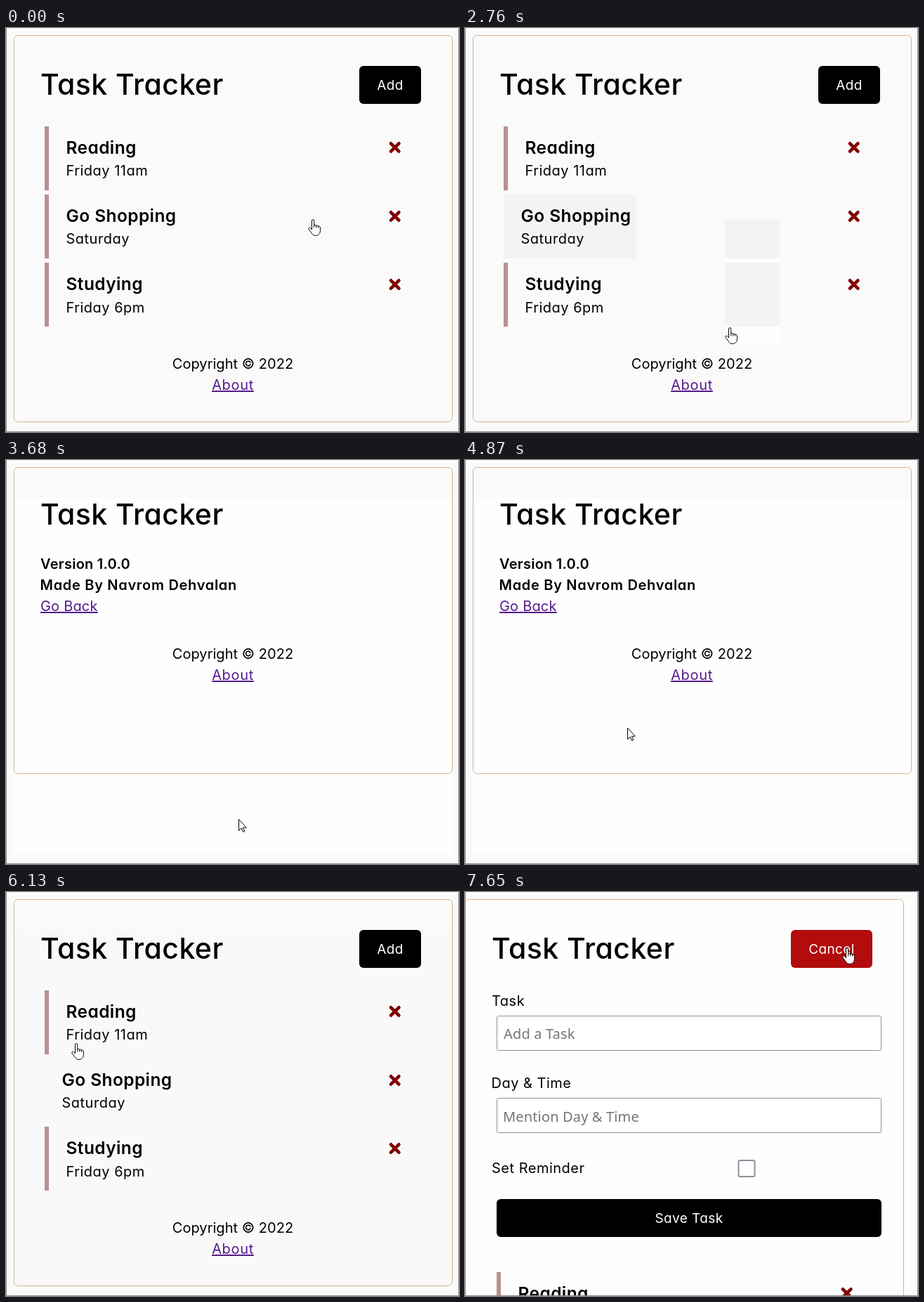
An HTML page for the animation above (8000 ms loop, 645 by 575 pixels).

```html
<!DOCTYPE html>
<html lang="en">
<head>
<meta charset="utf-8">
<title>Task Tracker</title>
<style>
html, body { margin: 0; width: 100%; height: 100%; overflow: hidden; background: #fafafa; }
svg { display: block; width: 100%; height: 100%; }
text { font: 400 20px Inter, "Open Sans", sans-serif; font-feature-settings: "cv11"; letter-spacing: .05px; white-space: pre; }
.title { font-size: 41px; font-weight: 500; letter-spacing: .45px; }
.name { font-size: 24.5px; font-weight: 600; letter-spacing: .4px; }
.sub { letter-spacing: .5px; }
.strong { font-weight: 600; letter-spacing: .25px; }
.credit { letter-spacing: .7px; }
.mid { text-anchor: middle; }
.link { fill: #551a8b; letter-spacing: .2px; text-decoration: underline 1px; text-underline-offset: 2px; }
.about { letter-spacing: .65px; }
.btn { font-size: 19px; letter-spacing: .4px; fill: #fff; }
.hint { font-family: "Noto Sans", sans-serif; font-feature-settings: normal; letter-spacing: .15px; fill: #757575; }
.bar { fill: #bc8f8f; }
.white { fill: #fefefe; }
.grey { fill: #f3f3f3; }
.card { fill: none; stroke: #d2b48c; }
.field { fill: #fff; stroke: #8f8f9d; }

/* Every change is a hard cut on one shared 8 s clock. */
.t { animation: 8s step-end infinite; }

#list { animation-name: list; }
@keyframes list { 0%, 76.625% { opacity: 1 } 46%, 95.625%, 100% { opacity: 0 } }
#about { animation-name: about; }
@keyframes about { 0%, 76.625%, 100% { opacity: 0 } 46% { opacity: 1 } }
#form { animation-name: form; }
@keyframes form { 0% { opacity: 0 } 95.625%, 100% { opacity: 1 } }

#first { animation-name: first; }
@keyframes first { 0% { opacity: 1 } 46%, 100% { opacity: 0 } }
#second { animation-name: second; }
@keyframes second { 0% { opacity: 0 } 76.625%, 100% { opacity: 1 } }

#a1 { animation-name: a1; }
@keyframes a1 { 0% { opacity: 0 } 6.25%, 100% { opacity: 1 } }
#a2 { animation-name: a2; }
@keyframes a2 { 0% { opacity: 0 } 34.5%, 100% { opacity: 1 } }
#a3 { animation-name: a3; }
@keyframes a3 { 0% { opacity: 0 } 36.375%, 100% { opacity: 1 } }
#a4 { animation-name: a4; }
@keyframes a4 { 0% { opacity: 0 } 42.375%, 100% { opacity: 1 } }
#b1 { animation-name: b1; }
@keyframes b1 { 0% { opacity: 0 } 82.125%, 100% { opacity: 1 } }
#b2 { animation-name: b2; }
@keyframes b2 { 0% { opacity: 0 } 83.75%, 100% { opacity: 1 } }
#b3 { animation-name: b3; }
@keyframes b3 { 0% { opacity: 0 } 85.3125%, 100% { opacity: 1 } }
#b4 { animation-name: b4; }
@keyframes b4 { 0% { opacity: 0 } 86.9375%, 100% { opacity: 1 } }

#mark { animation-name: mark; }
@keyframes mark { 0% { opacity: 1 } 6.25%, 100% { opacity: 0 } }
#shop { animation-name: shop; }
@keyframes shop { 0% { transform: none } 6.25%, 100% { transform: translateX(-6px) } }
#more { animation-name: more; }
@keyframes more { 0%, 44%, 100% { fill: #551a8b } 42.375% { fill: #e00 } }
#add { transform-origin: 547px 81px; animation-name: press; }
@keyframes press { 0% { transform: none } 93.75%, 100% { transform: scale(.977) } }

#cursor { animation-name: move; }
@keyframes move {
  0% { transform: translate(430px, 272px) }
  34.5% { transform: translate(370px, 426px) }
  36.375% { transform: translate(325px, 524px) }
  38.125% { transform: translate(325px, 525px) }
  40.125% { transform: translate(325px, 515px) }
  44% { transform: translate(325px, 511px) }
  59.25% { transform: translate(274px, 447px) }
  60.875% { transform: translate(225px, 381px) }
  62.625% { transform: translate(136px, 294px) }
  64.375% { transform: translate(114px, 252px) }
  65.875% { transform: translate(95px, 226px) }
  67.75% { transform: translate(93px, 217px) }
  69.375% { transform: translate(93px, 215px) }
  82.125% { transform: translate(300px, 156px) }
  83.75% { transform: translate(445px, 100px) }
  85.3125% { transform: translate(481px, 83px) }
  86.9375% { transform: translate(522px, 80px) }
  88.5% { transform: translate(536px, 79px) }
  90.375%, 100% { transform: translate(537px, 79px) }
}
#hand { animation-name: hand; }
@keyframes hand {
  0%, 40.125%, 67.75%, 86.9375%, 100% { opacity: 1 }
  38.125%, 46%, 83.75% { opacity: 0 }
}
#arrow { animation-name: arrow; }
@keyframes arrow {
  0%, 40.125%, 67.75%, 86.9375%, 100% { opacity: 0 }
  38.125%, 46%, 83.75% { opacity: 1 }
}
</style>
</head>
<body>
<svg viewBox="0 0 645 575">
  <defs>
    <path id="cross" d="M-5.7-5.7 5.7 5.7M5.7-5.7-5.7 5.7" fill="none" stroke="#800000" stroke-width="4.7" stroke-linecap="round"/>
    <clipPath id="view"><path d="M1 10h635v564H1z"/></clipPath>
  </defs>
  <rect width="645" height="575" fill="#fafafa"/>

  <g id="list" class="t">
    <g id="first" class="t">
      <rect id="a1" class="t grey" x="55" y="237" width="189" height="91"/>
      <g id="a2" class="t">
        <rect class="white" x="370" y="272" width="78" height="178"/>
        <rect class="grey" x="370" y="272" width="78" height="56"/>
        <rect class="grey" x="370" y="334" width="78" height="91"/>
      </g>
      <rect id="a3" class="t white" x="325" y="426" width="63" height="122"/>
      <rect id="a4" class="t white" x="293" y="500" width="60" height="39"/>
    </g>
    <g id="second" class="t">
      <rect x="11" y="54" width="625" height="507" fill="#f9f9f9"/>
      <g id="b1" class="t">
        <rect class="white" x="93" y="156" width="225" height="83"/>
        <rect class="grey" x="93" y="156" width="225" height="75"/>
        <rect class="grey" x="93" y="237" width="225" height="2"/>
      </g>
      <g id="b2" class="t">
        <rect class="white" x="300" y="100" width="163" height="80"/>
        <rect class="grey" x="300" y="140" width="163" height="40"/>
      </g>
      <rect id="b3" class="t white" x="451" y="83" width="48" height="36"/>
      <rect id="b4" class="t white" x="487" y="79" width="67" height="24"/>
    </g>
    <rect class="card" x="11.5" y="10.5" width="624" height="550" rx="5.75"/>
    <text class="title" x="49" y="95">Task Tracker</text>
    <g id="add" class="t">
      <rect x="503" y="54" width="88" height="54" rx="6"/>
      <text class="btn mid" x="547" y="88">Add</text>
    </g>
    <rect class="bar" x="55" y="140" width="6" height="91"/>
    <text class="name" x="85.5" y="179">Reading</text>
    <text class="sub" x="85.5" y="210">Friday 11am</text>
    <use href="#cross" x="553.7" y="170"/>
    <rect id="mark" class="t bar" x="55" y="237" width="6" height="91"/>
    <g id="shop" class="t">
      <text class="name" x="85.5" y="276">Go Shopping</text>
      <text class="sub" x="85.5" y="307">Saturday</text>
    </g>
    <use href="#cross" x="553.7" y="268"/>
    <rect class="bar" x="55" y="334" width="6" height="91"/>
    <text class="name" x="85.5" y="373">Studying</text>
    <text class="sub" x="85.5" y="405">Friday 6pm</text>
    <use href="#cross" x="553.7" y="365"/>
    <text class="mid" x="323" y="485">Copyright © 2022</text>
    <text id="more" class="t mid link about" x="323" y="515">About</text>
  </g>

  <g id="about" class="t">
    <rect class="white" x="11" y="54" width="625" height="507"/>
    <rect class="card" x="11.5" y="10.5" width="624" height="436" rx="5.75"/>
    <text class="title" x="49" y="92">Task Tracker</text>
    <text class="strong" x="49" y="155">Version 1.0.0</text>
    <text class="strong credit" x="48.5" y="185">Made By Navrom Dehvalan</text>
    <text class="link" x="49" y="215">Go Back</text>
    <text class="mid" x="323" y="283">Copyright © 2022</text>
    <text class="mid link about" x="323" y="313">About</text>
  </g>

  <g id="form" class="t">
    <g clip-path="url(#view)">
      <rect class="white" x="1" y="10" width="635" height="564"/>
      <rect class="card" x=".5" y="10.5" width="624" height="600" rx="5.75"/>
      <text class="title" x="38" y="95">Task Tracker</text>
      <rect x="464" y="54" width="116" height="54" rx="6" fill="#b20c0c"/>
      <text class="btn mid" x="522" y="88">Cancel</text>
      <text class="sub" x="38" y="162">Task</text>
      <rect class="field" x="45.5" y="176.5" width="547" height="49" rx="2"/>
      <text class="hint" x="55" y="209">Add a Task</text>
      <text class="sub" x="37.5" y="279">Day &amp; Time</text>
      <rect class="field" x="45.5" y="293.5" width="547" height="49" rx="2"/>
      <text class="hint" x="54" y="327">Mention Day &amp; Time</text>
      <text class="sub" x="38" y="400">Set Reminder</text>
      <rect class="field" x="389.5" y="382" width="23" height="23" rx="2" stroke-width="2"/>
      <rect x="45" y="437" width="548" height="54" rx="6"/>
      <text class="btn mid" x="319" y="471">Save Task</text>
      <rect class="bar" x="45" y="541" width="6" height="91"/>
      <text class="name" x="75.5" y="580">Reading</text>
      <use href="#cross" x="543.7" y="571"/>
    </g>
  </g>

  <path d="M.5 0V574.5H644.5V0" fill="none" stroke="#8c8c8c"/>

  <g id="cursor" class="t" fill="#fff" stroke="#000" stroke-linejoin="round">
    <g id="hand" class="t">
      <path d="M5.5 14.8V2.2a1.6 1.6 0 0 1 3.2 0V8.6Q10.4 7.6 11.6 9.2Q13.2 8.4 14.4 10Q17 9.4 17.4 12V16.5C17.4 21 14.5 23.4 11 23.4C8 23.4 6.6 22.2 5.3 20.2L1 14.4C.2 12.6 2 11.4 3.4 12.6Z"/>
      <path d="M8.7 8.6v3.6M11.6 9.2v3.2M14.4 10v2.6" fill="none"/>
    </g>
    <path id="arrow" class="t" d="M6.5.5V16.5L10.2 13 12.6 18.4 14.8 17.5 12.4 12.2H17.4Z"/>
  </g>
</svg>
</body>
</html>
```
